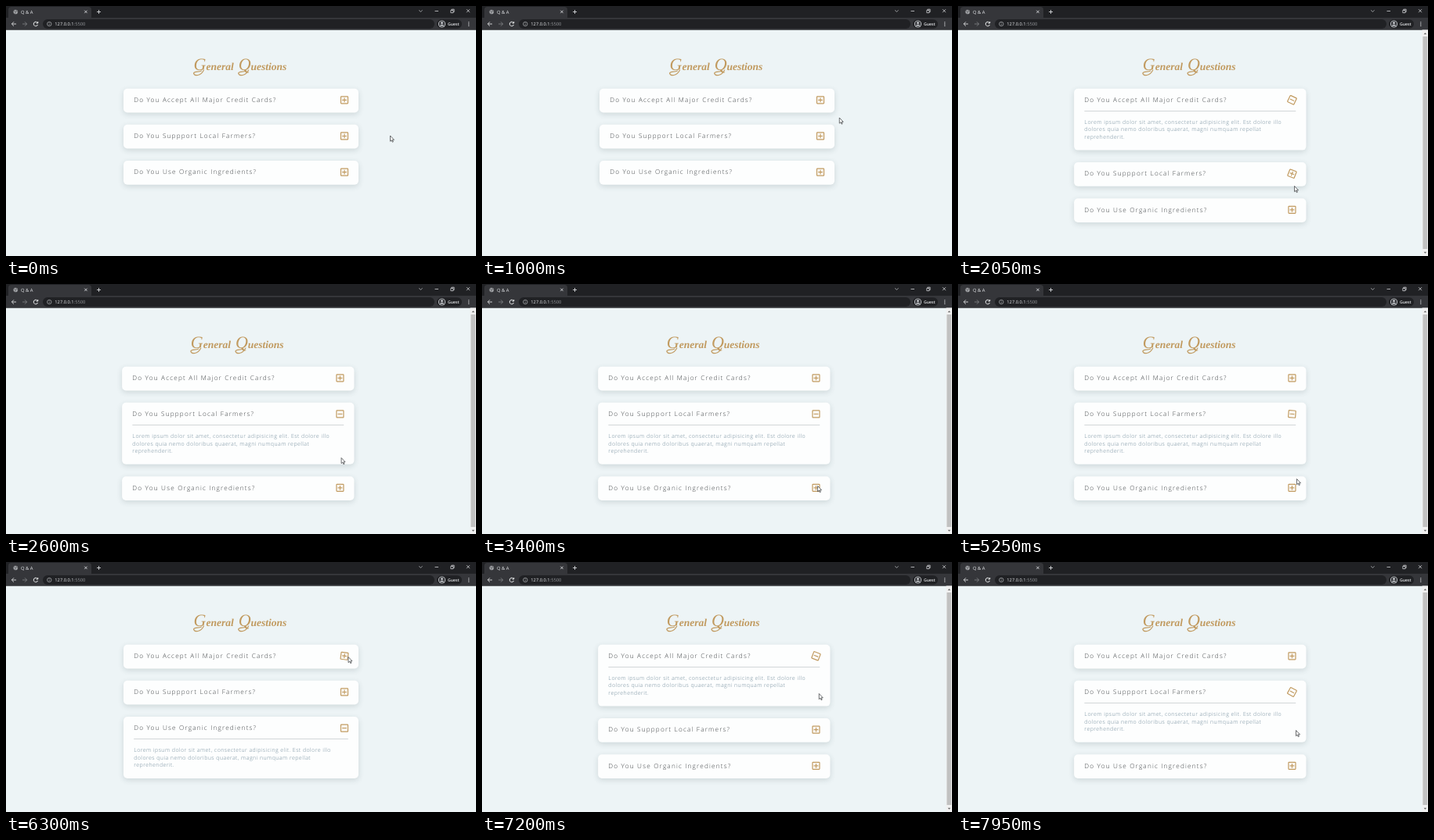
An HTML page with a canvas for the animation above (8 s loop, 600x320 px).

```html
<!DOCTYPE html>
<html lang="en">
<head>
<meta charset="utf-8">
<title>Q &amp; A</title>
<style>
html, body { margin: 0; width: 100%; height: 100%; overflow: hidden; background: #edf4f6; }
canvas { display: block; }
</style>
</head>
<body>
<canvas id="stage" width="600" height="320"></canvas>
<script>
const ctx = document.getElementById('stage').getContext('2d');
const LOOP = 8000, STEP = 50, TICK = 5;
const GOLD = '#c19a5f', LIGHT = '#e8eaed';
const SANS = '"Open Sans", "Noto Sans", sans-serif';
const SERIF = '"Liberation Serif", "Noto Serif", serif';

const questions = [
  'Do You Accept All Major Credit Cards?',
  'Do You Suppport Local Farmers?',
  'Do You Use Organic Ingredients?'
];
const answer = [
  'Lorem ipsum dolor sit amet, consectetur adipisicing elit. Est dolore illo',
  'dolores quia nemo doloribus quaerat, magni numquam repellat',
  'reprehenderit.'
];

// Pointer stops; an item is clicked halfway through the stay
const stop = (arrive, leave, x, y, item) => ({ arrive, leave, x, y, item, click: (arrive + leave) / 2 });
const stops = [
  stop(0, 0, 490.5, 165.5),
  stop(400, 400, 538, 207),
  stop(1200, 1830, 429, 121, 0),
  stop(1960, 2030, 430, 214),
  stop(2050, 2050, 429.5, 230),
  stop(2300, 2500, 428, 214, 1),
  stop(3050, 3900, 428.5, 258, 2),
  stop(4150, 4960, 429, 170, 1),
  stop(5250, 5250, 432.5, 249),
  stop(5340, 5700, 429, 258, 2),
  stop(6300, 6300, 437, 121),
  stop(6400, 6950, 429, 121, 0),
  stop(7450, 8050, 431.5, 215, 1)
];

function pointerAt(t) {
  const i = stops.findLastIndex(s => s.arrive <= t);
  const a = stops[i], b = stops[i + 1];
  if (t <= a.leave || !b) return a;
  const p = (t - a.leave) / (b.arrive - a.leave);
  return { x: a.x + (b.x - a.x) * p, y: a.y + (b.y - a.y) * p };
}

function openAt(t) {
  const last = stops.findLast(s => s.item !== undefined && s.click <= t);
  return last ? last.item : -1;
}

// The page scrolls unless the last card is the open one
function layout(open) {
  const scrolls = open === 0 || open === 1;
  const width = scrolls ? 592.6 : 600;
  const cards = questions.map((_, i) => {
    const y = 105.7 + i * 46.15 + (open >= 0 && i > open ? 48.2 : 0);
    return { x: width / 4, y, w: width / 2, bx: width * .75 - 18, by: y + 14.6, open: i === open };
  });
  return { scrolls, width, cards };
}

// Hovered buttons turn towards 90 degrees in 300 ms, others turn back
function simulate() {
  const frames = [], angles = [0, 0, 0];
  for (let t = 0; t < LOOP; t += TICK) {
    const p = pointerAt(t);
    layout(openAt(t)).cards.forEach((c, i) => {
      const hovered = Math.max(Math.abs(p.x - c.bx), Math.abs(p.y - c.by)) < 5.3;
      const turn = TICK * .3 * (hovered ? 1 : -1);
      angles[i] = Math.min(90, Math.max(0, angles[i] + turn));
    });
    if (t % STEP === 0) frames.push([...angles]);
  }
  return frames;
}
const turns = simulate();

function rect(x, y, w, h, color) {
  ctx.fillStyle = color;
  ctx.fillRect(x, y, w, h);
}

function rounded(x, y, w, h, r, color) {
  ctx.fillStyle = color;
  ctx.beginPath();
  ctx.roundRect(x, y, w, h, r);
  ctx.fill();
}

function stroke(d, color, width = .8) {
  ctx.strokeStyle = color;
  ctx.lineWidth = width;
  ctx.stroke(new Path2D(d));
}

function circle(x, y, r, color) {
  ctx.fillStyle = color;
  ctx.beginPath();
  ctx.arc(x, y, r, 0, 7);
  ctx.fill();
}

function text(str, x, y, font, color, spacing = 0) {
  ctx.font = font;
  ctx.textRendering = 'geometricPrecision';
  ctx.letterSpacing = spacing + 'px';
  ctx.fillStyle = color;
  ctx.fillText(str, x, y);
  return ctx.measureText(str).width;
}

function browserBar() {
  rect(0, 0, 600, 30.5, '#202124');
  rounded(3, 1, 106, 20, 4, '#35363a');
  rect(0, 15, 600, 15.5, '#35363a');
  circle(12.3, 7.5, 2.8, '#a5a7aa');
  stroke('M10.3 6.2L12.5 7.3L11.5 9.5M13 5.2L14.5 7.8', '#4a4b4f');
  text('Q & A', 19, 9.6, `500 5.8px ${SANS}`, LIGHT);
  stroke('M100.2 5.7L103.6 9.1M103.6 5.7L100.2 9.1', LIGHT);
  stroke('M116 7.5h5M118.5 5v5', LIGHT);
  stroke('M527.2 5.4L529.4 7.4L531.6 5.4', '#b8babd');
  stroke('M547.5 6.5h4.5M567.8 5.5h3.2v3.2h-3.2zM568.8 5.2v-1h3.3v3.3h-1M588 4.2l4 4M592 4.2l-4 4', LIGHT, .7);

  stroke('M13 23H7.5M10 20.3L7.3 23L10 25.7', '#f1f3f4');
  stroke('M21 23H26.5M24 20.3L26.7 23L24 25.7', '#85878a');
  stroke('M40.3 21.6A2.7 2.7 0 1 0 40.5 24M40.7 20V22H38.6', '#f1f3f4', 1);
  rounded(47, 17, 500, 12, 6, '#202124');
  stroke('M58 23A2.7 2.7 0 1 1 52.6 23A2.7 2.7 0 1 1 58 23M55.3 22.7V24.5M55.3 21.3V22', '#b4b6b9', .7);
  const w = text('127.0.0.1', 62.3, 25.1, `500 5.75px ${SANS}`, LIGHT);
  text(':5500', 62.3 + w, 25.1, `5.75px ${SANS}`, '#96999d');

  rounded(550, 17.2, 32, 11.6, 5.8, '#202124');
  circle(556.5, 23, 4.6, '#c9ccd0');
  circle(556.5, 23, 3.7, '#35363a');
  circle(556.5, 21.7, 1.4, '#c9ccd0');
  ctx.fill(new Path2D('M553.7 25.6C554.4 23.2 558.6 23.2 559.3 25.6Z'));
  text('Guest', 564, 25, `600 5.2px ${SANS}`, LIGHT);
  for (const dy of [-2.2, 0, 2.2]) circle(590.8, 23 + dy, .65, LIGHT);
}

function scrollbar() {
  rect(592.6, 30.5, 7.4, 289.5, '#f1f1f1');
  rect(593.4, 39, 5.8, 272, '#c1c1c1');
  ctx.fillStyle = '#606060';
  ctx.fill(new Path2D('M594.6 36.2l1.8-2l1.8 2zM594.6 314.8l1.8 2l1.8-2z'));
}

// Italic lettering with large capitals, each with a swash below
function heading(x) {
  for (const word of ['General', 'Questions']) {
    ctx.save();
    ctx.translate(x, 82);
    ctx.lineCap = 'round';
    stroke('M13 0C9 8 1 8 0 4C1 1 6 3 10 1', GOLD, 1.1);
    ctx.restore();
    x += text(word[0], x, 82, `italic 22px ${SERIF}`, GOLD);
    x += text(word.slice(1), x, 82, `italic bold 13.5px ${SERIF}`, GOLD) + 6;
  }
}

function button(x, y, degrees, open) {
  ctx.save();
  ctx.translate(x, y);
  ctx.rotate(degrees * Math.PI / 180);
  ctx.strokeStyle = GOLD;
  ctx.lineWidth = 1.2;
  ctx.beginPath();
  ctx.roundRect(-4.5, -4.5, 9, 9, .7);
  ctx.stroke();
  stroke(open ? 'M-2.9 0h5.8' : 'M-2.9 0h5.8M0-2.9v5.8', GOLD, 1.15);
  ctx.restore();
}

function card({ x, y, w, bx, by, open }, question, degrees) {
  ctx.save();
  ctx.shadowColor = 'rgba(40, 60, 70, .16)';
  ctx.shadowBlur = 7;
  ctx.shadowOffsetY = 2.2;
  rounded(x, y, w, open ? 78.9 : 30.7, 5, '#fdfefe');
  ctx.restore();
  const left = x + 13.2;
  text(question, left, y + 17.3, `300 8.2px ${SANS}`, '#3c4043', 1.19);
  button(bx, by, degrees, open);
  if (!open) return;
  rect(left, Math.round(y + 28.2), w - 26.4, 1, '#d2d6d8');
  answer.forEach((line, n) => text(line, left, y + 45 + n * 9.65, `300 7.03px ${SANS}`, '#6f8a9a', .44));
}

function arrow({ x, y }) {
  ctx.save();
  ctx.translate(x, y + .5);
  const shape = 'M0 0V7.2L1.7 5.7L2.8 8.2L3.9 7.7L2.8 5.3H5Z';
  ctx.fillStyle = '#fff';
  ctx.fill(new Path2D(shape));
  stroke(shape, '#3c3f42', .75);
  ctx.restore();
}

function draw(t) {
  const { scrolls, width, cards } = layout(openAt(t));
  rect(0, 0, 600, 320, '#edf4f6');
  browserBar();
  heading(width / 2 - 60.5);
  cards.forEach((c, i) => card(c, questions[i], turns[t / STEP][i]));
  if (scrolls) scrollbar();
  arrow(pointerAt(t));
}

function tick() {
  const t = performance.now() % LOOP;
  draw(Math.floor(t / STEP) * STEP);
  requestAnimationFrame(tick);
}
tick();
</script>
</body>
</html>
```
